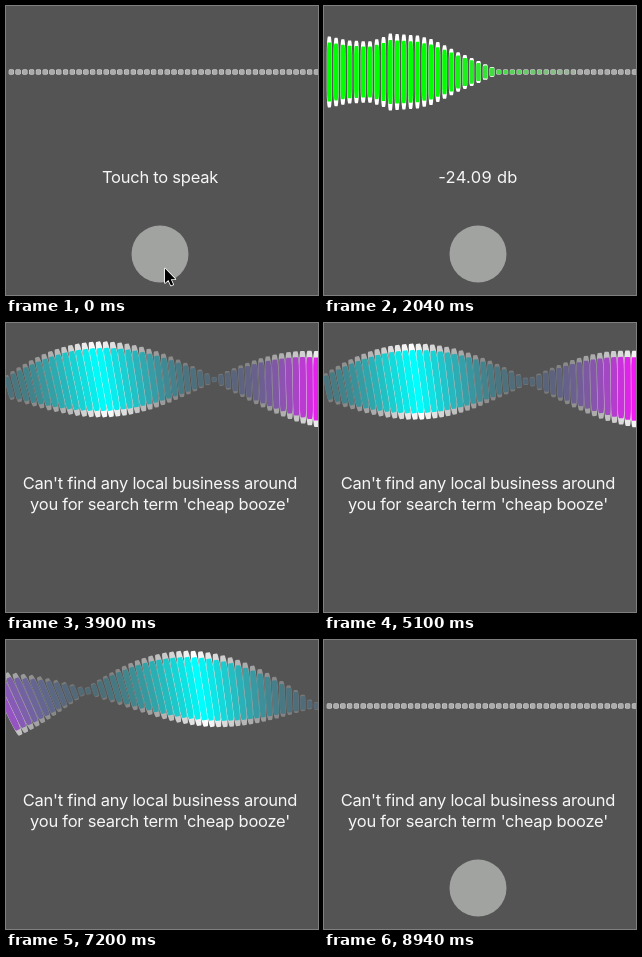
Write an HTML page with a canvas that moves like this. It is 312x289 px and loops after 9.12 s.

```html
<!DOCTYPE html>
<html lang="en">
<head>
<meta charset="utf-8">
<title>Voice assistant</title>
<style>
html, body { margin: 0; width: 100%; height: 100%; overflow: hidden; background: #545454; }
canvas { display: block; width: 312px; height: 289px; }
</style>
</head>
<body>
<canvas id="stage"></canvas>
<script>
const W = 312, H = 289, LOOP = 9120, STEP = 60;
const canvas = document.getElementById('stage');
const ctx = canvas.getContext('2d');
const ratio = window.devicePixelRatio || 1;
canvas.width = W * ratio;
canvas.height = H * ratio;

// Row of bars: each repeats the one to its right after a short delay.
const COUNT = 46, PITCH = 6.78, DOT = 5.1, DELAY = 18;
const CX = 154, CY = 66, FIRST_X = 156.4;

const LISTEN = 300, RELEASE = 1530, SPEAK = 2442, END = 7840;
const HALF = 297; // time of one stretch of a bar

const GRAY = [170, 170, 170], GREEN = [0, 255, 0];
const MAGENTA = [255, 20, 255], CYAN = [0, 255, 255];

// Bar height over time while listening
const LEVELS = [
  [300, 5.1], [390, 26], [480, 60], [590, 82], [690, 66], [790, 50],
  [890, 72], [990, 83], [1090, 68], [1170, 75], [1230, 71], [1283, 63],
  [1336, 61], [1374, 70], [1392, 77], [1463, 73], [1500, 66], [1535, 54],
  [1571, 40], [1608, 28], [1643, 16], [1662, 10], [1680, 5.1]
];

const clamp = v => Math.max(0, Math.min(1, v));
const mix = (a, b, k) => a + (b - a) * k;
const mixColor = (a, b, k) => a.map((v, i) => mix(v, b[i], k));
const easeOut = u => Math.sin(clamp(u) * Math.PI / 2);
const easeInOut = u => (1 - Math.cos(Math.PI * u)) / 2;

// 0 to 1 and back, each way taking d
function swing(t, d) {
  const u = (t / d) % 2;
  return u > 1 ? 2 - u : u;
}

function level(t) {
  if (t <= LEVELS[0][0]) return DOT;
  for (let i = 1; i < LEVELS.length; i++) {
    const [t0, h0] = LEVELS[i - 1], [t1, h1] = LEVELS[i];
    if (t < t1) return mix(h0, h1, (t - t0) / (t1 - t0));
  }
  return DOT;
}

function listenBar(t) {
  const color = t < RELEASE
    ? mixColor(GRAY, GREEN, clamp((t - LISTEN) / 225))
    : mixColor(GREEN, GRAY, clamp((t - RELEASE) / 370));
  return { sx: 1, sy: level(t) / DOT, alpha: 1, color };
}

function speakBar(t) {
  const s = t - SPEAK;
  const grow = easeOut(swing(s, HALF));
  const fade = s < HALF ? 0 : easeOut(swing(s - HALF, HALF));
  const tint = s < 280 ? 0 : easeOut(swing(s - 280, 2 * HALF));
  return {
    sx: 1 + 0.4 * grow,
    sy: 1 + 14 * grow,
    alpha: 1 - 0.8 * fade,
    color: mixColor(MAGENTA, CYAN, tint)
  };
}

function barAt(t) {
  if (t < SPEAK) return listenBar(t);
  if (t < END) return speakBar(t);
  const last = speakBar(END);
  const k = easeOut((t - END) / HALF);
  return {
    sx: mix(last.sx, 1, k),
    sy: mix(last.sy, 1, k),
    alpha: mix(last.alpha, 1, k),
    color: mixColor(last.color, GRAY, clamp((t - END) / 225))
  };
}

// Turn from one bar to the next, which bends the row into an arc
function bend(t) {
  const s = t - SPEAK;
  if (s < 0 || t >= END) return 0;
  if (s < HALF) return 0.01 * easeOut(s / HALF);
  return 0.01 - 0.02 * easeInOut(swing(s - HALF, 3 * HALF));
}

function drawBar({ sx, sy, alpha, color }) {
  const r = DOT / 2, side = 0.22, tip = 0.43;
  ctx.save();
  ctx.translate(FIRST_X, 0);
  ctx.scale(sx, sy);
  ctx.globalAlpha = alpha;
  ctx.fillStyle = '#fff';
  ctx.beginPath();
  ctx.roundRect(-r, -r, DOT, DOT, 1.27);
  ctx.fill();
  ctx.globalAlpha = 1;
  ctx.fillStyle = `rgb(${color.map(v => Math.round(mix(84, v, alpha)))})`;
  ctx.beginPath();
  ctx.roundRect(-r + side, -r + tip, DOT - 2 * side, DOT - 2 * tip, 0.85);
  ctx.fill();
  ctx.restore();
}

function drawRow(t) {
  const turn = bend(t);
  ctx.save();
  ctx.translate(CX, CY);
  for (let i = 0; i < COUNT; i++) {
    drawBar(barAt(t - i * DELAY));
    ctx.translate(-PITCH, 0);
    ctx.rotate(turn);
  }
  ctx.restore();
}

function label(text, y, spacing = -0.25) {
  ctx.letterSpacing = spacing + 'px';
  ctx.fillText(text, CX, y);
}

function drawText(t) {
  ctx.font = '16.5px Inter, Roboto, sans-serif';
  ctx.textAlign = 'center';
  ctx.fillStyle = '#f6f6f6';
  if (t < LISTEN) {
    label('Touch to speak', 177);
  } else if (t < SPEAK) {
    const db = t < RELEASE - 30 ? 2 * level(t) / DOT - 50 : -24.09;
    label(db.toFixed(2) + ' db', 177, 0.3);
  } else {
    label("Can't find any local business around", 166);
    label("you for search term 'cheap booze'", 187);
  }
}

function drawButton() {
  ctx.fillStyle = '#a1a3a1';
  ctx.beginPath();
  ctx.arc(CX, 248, 28.5, 0, 2 * Math.PI);
  ctx.fill();
}

function drawCursor() {
  const arrow = new Path2D('M159 262.5V277L162.4 274L164.9 279.5L167.2 278.5L164.8 273.2H169.4Z');
  ctx.lineWidth = 1.6;
  ctx.lineJoin = 'round';
  ctx.strokeStyle = '#fff';
  ctx.stroke(arrow);
  ctx.fillStyle = '#000';
  ctx.fill(arrow);
}

function draw(t) {
  ctx.setTransform(ratio, 0, 0, ratio, 0, 0);
  ctx.fillStyle = '#545454';
  ctx.fillRect(0, 0, W, H);
  drawRow(t);
  drawText(t);
  if (t < SPEAK || t >= END) drawButton();
  if (t < STEP) drawCursor();
}

const start = performance.now();
function tick() {
  const t = (performance.now() - start) % LOOP;
  draw(Math.floor(t / STEP) * STEP);
  requestAnimationFrame(tick);
}
tick();
</script>
</body>
</html>
```
